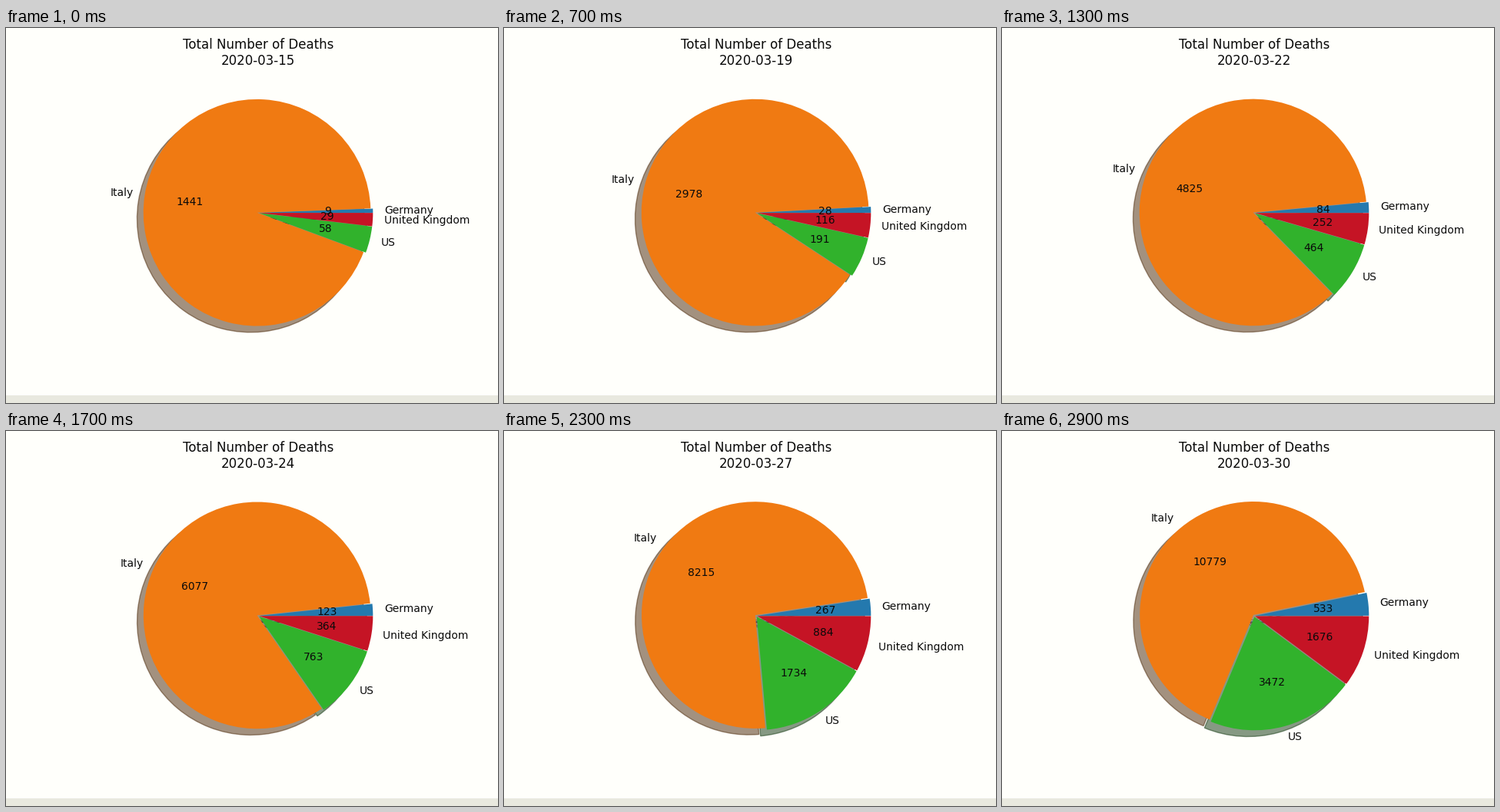
Animation, 640 px wide and 489 px high, one loop 3000 ms. Source, as a matplotlib script:

```python
import matplotlib.pyplot as plt
from matplotlib.animation import FuncAnimation
from matplotlib.patches import Rectangle

WIDTH, HEIGHT, DPI = 640, 489, 100
STEP_MS, LOOP_MS = 100, 3000

COUNTRIES = ["Germany", "Italy", "US", "United Kingdom"]
COLORS = ["#2479ae", "#f07a12", "#31b22c", "#c51425"]
PAPER, STRIP, INK = "#fffffb", "#e9e9df", "#0a0a0a"

# start in ms, day of March, deaths per country
ROWS = [
    (0, 15, 9, 1441, 58, 29),
    (200, 16, 11, 1809, 70, 43),
    (300, 17, 17, 2158, 97, 65),
    (700, 19, 28, 2978, 191, 116),
    (900, 20, 44, 3405, 265, 162),
    (1100, 21, 67, 4032, 360, 195),
    (1300, 22, 84, 4825, 464, 252),
    (1700, 24, 123, 6077, 763, 364),
    (1900, 25, 157, 6820, 1002, 510),
    (2100, 26, 206, 7503, 1325, 699),
    (2300, 27, 267, 8215, 1734, 884),
    (2700, 29, 433, 10023, 2834, 1463),
    (2900, 30, 533, 10779, 3472, 1676),
]

plt.rcParams.update({
    "font.family": "DejaVu Sans",
    "font.size": 10,
    "text.color": INK,
    "axes.titlesize": 12,
})

# The small margin keeps the pixel size from being rounded down.
fig = plt.figure(figsize=((WIDTH + 0.01) / DPI, (HEIGHT + 0.01) / DPI),
                 dpi=DPI, facecolor=PAPER)
fig.add_artist(Rectangle((0, 0), 1, 10 / HEIGHT, color=STRIP, lw=0,
                         transform=fig.transFigure))
ax = fig.add_axes([80 / WIDTH, 63.2 / HEIGHT, 496 / WIDTH, 369.6 / HEIGHT])


def row_at(ms):
    return [row for row in ROWS if row[0] <= ms][-1]


def draw(step):
    _, day, *deaths = row_at(step * STEP_MS)
    total = sum(deaths)
    ax.clear()
    ax.pie(
        deaths,
        labels=COUNTRIES,
        colors=COLORS,
        explode=[0.01] * len(deaths),
        autopct=lambda pct: f"{pct * total / 100:.0f}",
        shadow={"ox": -0.04, "oy": -0.04},
    )
    ax.set_title(f"Total Number of Deaths\n2020-03-{day}", color=INK)
    return ax.get_children()


anim = FuncAnimation(fig, draw, frames=LOOP_MS // STEP_MS, interval=STEP_MS,
                     init_func=lambda: draw(0), repeat=True)
plt.show()
```
